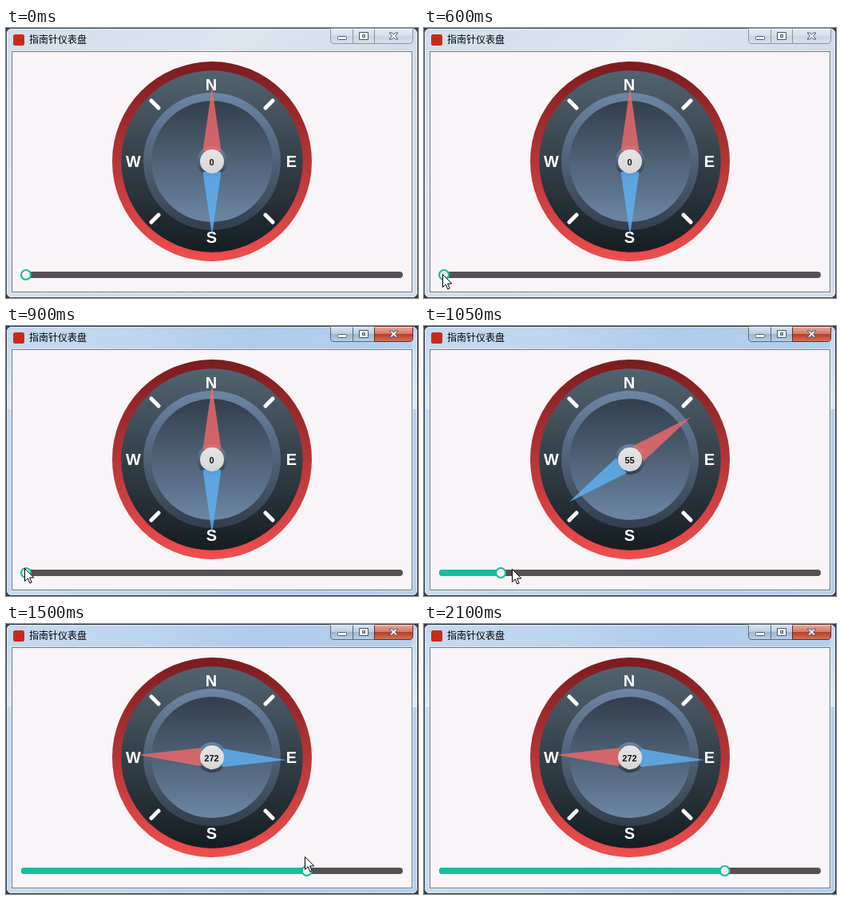
Animation, 516 px wide and 338 px high, one loop 2.25 s. Source, as an HTML page:

```html
<!DOCTYPE html>
<html lang="zh-CN">
<head>
<meta charset="utf-8">
<title>指南针仪表盘</title>
<style>
  html, body { margin: 0; width: 100%; height: 100%; overflow: hidden; background: #30373f; }
  svg { display: block; width: 516px; height: 338px; }
  .title { font: 12px "Noto Sans CJK SC", "Noto Sans CJK", sans-serif; fill: #000; }
  .dir { font: bold 20px "Liberation Sans", Arial, sans-serif; fill: #fff; text-anchor: middle; }
  .num { font: bold 11px "Liberation Sans", Arial, sans-serif; fill: #111; text-anchor: middle; }
</style>
</head>
<body>
<svg viewBox="0 0 516 338">
  <defs>
    <linearGradient id="idle" x2="1" y2="1">
      <stop offset="0" stop-color="#d3deeb"/><stop offset=".3" stop-color="#dde5ef"/>
      <stop offset=".55" stop-color="#d2dce8"/><stop offset="1" stop-color="#d3dde9"/>
    </linearGradient>
    <linearGradient id="live" x2="1" y2="0">
      <stop offset="0" stop-color="#c6daf0"/><stop offset=".3" stop-color="#bfd6ee"/>
      <stop offset=".6" stop-color="#b0cceb"/><stop offset="1" stop-color="#b4d0ed"/>
    </linearGradient>
    <linearGradient id="side" x2="0" y2="1">
      <stop offset="0" stop-color="#c3d8ef"/><stop offset="1" stop-color="#e0ebf7"/>
    </linearGradient>
    <linearGradient id="btn" x2="0" y2="1">
      <stop offset="0" stop-color="#e6edf5"/><stop offset=".48" stop-color="#d6e0ea"/>
      <stop offset=".5" stop-color="#c8d4e1"/><stop offset="1" stop-color="#d8e2ed"/>
    </linearGradient>
    <linearGradient id="btnLive" x2="0" y2="1">
      <stop offset="0" stop-color="#dbe7f3"/><stop offset=".48" stop-color="#bccfe2"/>
      <stop offset=".5" stop-color="#9db5cd"/><stop offset="1" stop-color="#b9d2e8"/>
    </linearGradient>
    <linearGradient id="close" x2="0" y2="1">
      <stop offset="0" stop-color="#e6b1a5"/><stop offset=".48" stop-color="#d07a68"/>
      <stop offset=".5" stop-color="#b83a22"/><stop offset="1" stop-color="#d5785a"/>
    </linearGradient>
    <linearGradient id="rim" x2="0" y2="1">
      <stop offset="0" stop-color="#7a1c1f"/><stop offset="1" stop-color="#f04e4e"/>
    </linearGradient>
    <linearGradient id="dial" x2="0" y2="1">
      <stop offset="0" stop-color="#526370"/><stop offset="1" stop-color="#151d22"/>
    </linearGradient>
    <linearGradient id="ring" x2="0" y2="1">
      <stop offset="0" stop-color="#6c86a3"/><stop offset="1" stop-color="#323e4c"/>
    </linearGradient>
    <linearGradient id="face" x2="0" y2="1">
      <stop offset="0" stop-color="#323e4c"/><stop offset="1" stop-color="#6c86a3"/>
    </linearGradient>
    <linearGradient id="knob" x2="0" y2="1">
      <stop offset="0" stop-color="#e6e6e6"/><stop offset="1" stop-color="#d6d6d6"/>
    </linearGradient>
    <g id="glyphs" fill="#fff" stroke="#4b5563">
      <rect x="415.5" y="10.500" width="11" height="4" rx="1"/>
      <path d="M442.500 5.500h11v9h-11zM446.500 8.500v3h3v-3z" fill-rule="evenodd"/>
      <path d="M480 6h3.500l2 2.300 2-2.300h3.500l-3.500 4 3.500 4h-3.500l-2-2.300-2 2.300H480l3.500-4z"/>
    </g>
  </defs>

  <rect width="516" height="338" fill="#30373f"/>
  <rect x=".5" y=".5" width="515" height="337" rx="6" fill="url(#idle)" stroke="#4a545f"/>
  <g fill="url(#btn)" stroke="#8793a1">
    <path d="M406.500.5V15q0 4.500 4.500 4.500h23.500V.5zM434.500.5h27v19h-27z"/>
    <path d="M461.500.5v19H505q4.500 0 4.500-4.500V.5z"/>
  </g>
  <g id="active">
    <rect x=".5" y=".5" width="515" height="337" rx="6" fill="url(#live)" stroke="#28323d"/>
    <path d="M1.500 7h6v97h-6zM508.500 7h6v97h-6z" fill="url(#side)"/>
    <g fill="url(#btnLive)" stroke="#56677a">
      <path d="M406.500.5V15q0 4.500 4.500 4.500h23.500V.5zM434.500.5h27v19h-27z"/>
      <path d="M461.500.5v19H505q4.500 0 4.500-4.500V.5z" fill="url(#close)" stroke="#5c2c2a"/>
    </g>
  </g>
  <rect x="1.500" y="1.500" width="513" height="335" rx="5" fill="none" stroke="#fff" stroke-opacity=".55"/>
  <use href="#glyphs"/>
  <rect x="9" y="8" width="14" height="14" rx="2.500" fill="#c92a18"/>
  <text class="title" x="29" y="19">指南针仪表盘</text>
  <rect x="6.500" y="28.500" width="503" height="303" fill="none" stroke="#fff" stroke-opacity=".5"/>
  <rect x="7.500" y="29.500" width="501" height="301" fill="#f8f4f8" stroke="#6d7884"/>

  <g transform="translate(258 167)">
    <circle r="125" fill="url(#rim)"/>
    <circle r="113.700" fill="url(#dial)"/>
    <circle r="86" fill="url(#ring)"/>
    <circle r="75.800" fill="url(#face)"/>
    <path d="M-76-76l9 9M76-76l-9 9M-76 76l9-9M76 76l-9-9" stroke="#fff" stroke-width="5" stroke-linecap="round"/>
    <g class="dir">
      <text x="-1" y="-89">N</text><text x="99.500" y="7">E</text>
      <text x="-.5" y="102">S</text><text x="-98.500" y="7">W</text>
    </g>
    <circle r="19" fill="url(#ring)"/>
    <g id="needle">
      <path d="M0-93L11.500-13H-11.500z" fill="#f26a6a" fill-opacity=".8"/>
      <path d="M0 93L11.500 13H-11.500z" fill="#5fb1f5" fill-opacity=".82"/>
    </g>
    <circle r="15" fill="url(#knob)"/>
    <text id="num" class="num" x="-.5" y="5">0</text>
  </g>

  <rect x="19" y="305" width="478" height="8" rx="4" fill="#545053"/>
  <rect id="fill" x="19" y="305" width="6" height="8" rx="4" fill="#1abc9c"/>
  <circle id="grip" cx="25" cy="309" r="6" fill="#f8f4f8" stroke="#1abc9c" stroke-width="2.200"/>
  <path id="mouse" d="M.5.5v16l3.700-3.600 2.600 6 2.400-1-2.600-5.900h5.200z" fill="#fff" stroke="#000"/>
</svg>
<script>
  const $ = id => document.getElementById(id);
  const STEP = 150, LOOP = 2250;

  // [start ms, heading, window focus, pointer x, pointer y]
  const steps = [
    [0, 0, 0, -40, 308],
    [300, 0, 0, -8, 308],
    [450, 0, 0, 11, 309],
    [600, 0, 0, 23, 308],
    [750, 0, .5, 23, 308],
    [900, 0, 1, 23, 303],
    [1050, 55, 1, 110, 304],
    [1200, 152, 1, 236, 304],
    [1350, 228, 1, 326, 298],
    [1500, 272, 1, 374, 291],
    [1650, 272, 1, 412, 299],
    [1800, 272, 1, 476, 318],
    [1950, 272, 1, 540, 340]
  ];

  function draw(ms) {
    const [, deg, focus, x, y] = steps.findLast(s => s[0] <= ms);
    const grip = 25 + deg * 1.293;
    $('needle').setAttribute('transform', `rotate(${deg})`);
    $('num').textContent = deg;
    $('fill').setAttribute('width', grip - 19);
    $('grip').setAttribute('cx', grip);
    $('active').setAttribute('opacity', focus);
    $('mouse').setAttribute('transform', `translate(${x} ${y})`);
  }

  const start = performance.now();
  function tick() {
    const ms = (performance.now() - start) % LOOP;
    draw(Math.floor(ms / STEP) * STEP);
    requestAnimationFrame(tick);
  }
  draw(0);
  requestAnimationFrame(tick);
</script>
</body>
</html>
```
